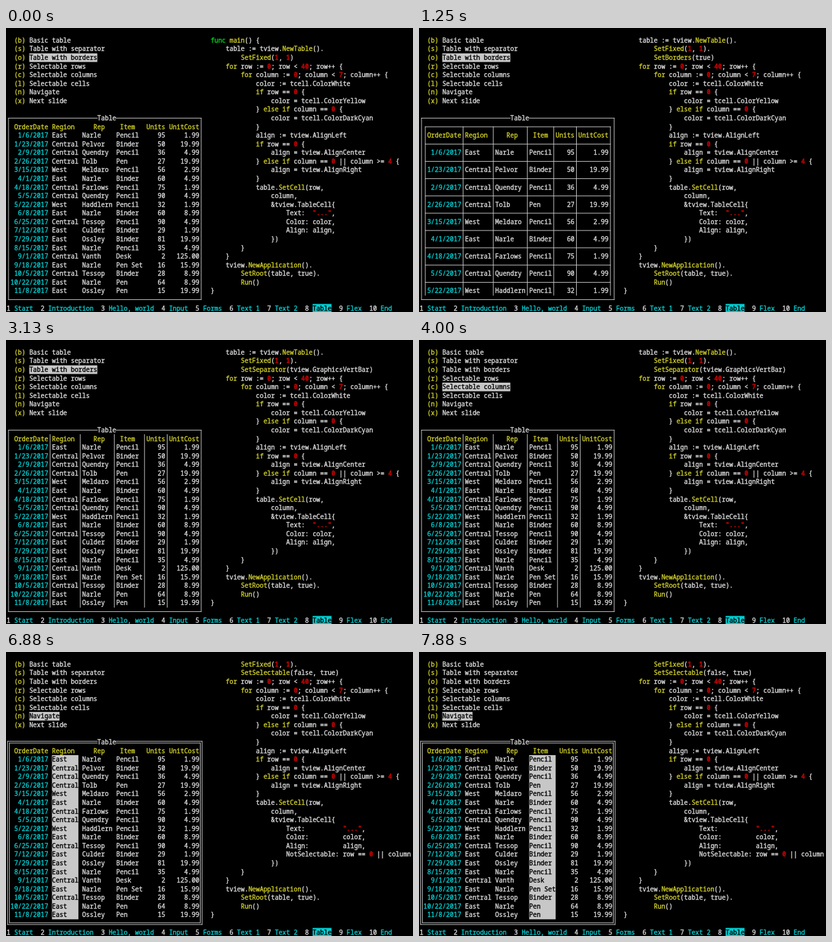
An HTML page with a canvas for the animation above (8000 ms loop, 640 px wide and 446 px high).

```html
<!DOCTYPE html>
<html lang="en">
<head>
<meta charset="utf-8">
<title>Terminal table</title>
<style>
  html, body { margin: 0; width: 100%; height: 100%; overflow: hidden; background: #000; }
  canvas { display: block; width: 640px; height: 446px; }
</style>
</head>
<body>
<canvas id="screen"></canvas>
<script>
const WIDTH = 640, HEIGHT = 446, LOOP = 8000;
const CELL_W = 5.94, CELL_H = 13.57, LEFT = 1, TOP = -0.9;
const WHITE = '#dadada', GRAY = '#c7c7c7', YELLOW = '#cfcd2a', CYAN = '#00cdd0',
      GREEN = '#00d420', RED = '#b80404', BLACK = '#000';

const canvas = document.getElementById('screen');
const ctx = canvas.getContext('2d');
const dpr = window.devicePixelRatio || 1;
canvas.width = WIDTH * dpr;
canvas.height = HEIGHT * dpr;
ctx.scale(dpr, dpr);
ctx.lineWidth = 0.4;
ctx.lineJoin = 'round';

const MENU = ['b Basic table', 's Table with separator', 'o Table with borders', 'r Selectable rows',
  'c Selectable columns', 'l Selectable cells', 'n Navigate', 'x Next slide'];

const TABS = ['Start', 'Introduction', 'Hello, world', 'Input', 'Forms', 'Text 1', 'Text 2',
  'Table', 'Flex', 'End'];

const HEADER = ['OrderDate', 'Region', 'Rep', 'Item', 'Units', 'UnitCost'];
const ORDERS = `1/6,East,Narle,Pencil,95,1.99
1/23,Central,Pelvor,Binder,50,19.99
2/9,Central,Quendry,Pencil,36,4.99
2/26,Central,Tolb,Pen,27,19.99
3/15,West,Meldaro,Pencil,56,2.99
4/1,East,Narle,Binder,60,4.99
4/18,Central,Farlows,Pencil,75,1.99
5/5,Central,Quendry,Pencil,90,4.99
5/22,West,Haddlern,Pencil,32,1.99
6/8,East,Narle,Binder,60,8.99
6/25,Central,Tessop,Pencil,90,4.99
7/12,East,Culder,Binder,29,1.99
7/29,East,Ossley,Binder,81,19.99
8/15,East,Narle,Pencil,35,4.99
9/1,Central,Vanth,Desk,2,125.00
9/18,East,Narle,Pen Set,16,15.99
10/5,Central,Tessop,Binder,28,8.99
10/22,East,Narle,Pen,64,8.99
11/8,East,Ossley,Pen,15,19.99`.split('\n').map(line => {
  const cells = line.split(',');
  cells[0] += '/2017';
  return cells;
});

// Extra call after SetFixed for each table mode
const CALLS = {
  basic: '',
  borders: 'SetBorders(true)',
  separator: 'SetSeparator(tview.GraphicsVertBar)',
  columns: 'SetSelectable(false, true)'
};

function codeFor(mode) {
  const call = CALLS[mode];
  const selectable = mode === 'columns';
  const field = (name, value) =>
    ' '.repeat(20) + (name + ':').padEnd(selectable ? 15 : 7) + value + ',\n';
  return `func main() {
    table := tview.NewTable().
        SetFixed(1, 1)${call && '.\n        ' + call}
    for row := 0; row < 40; row++ {
        for column := 0; column < 7; column++ {
            color := tcell.ColorWhite
            if row == 0 {
                color = tcell.ColorYellow
            } else if column == 0 {
                color = tcell.ColorDarkCyan
            }
            align := tview.AlignLeft
            if row == 0 {
                align = tview.AlignCenter
            } else if column == 0 || column >= 4 {
                align = tview.AlignRight
            }
            table.SetCell(row,
                column,
                &tview.TableCell{
${field('Text', '"..."')}${field('Color', 'color')}${field('Align', 'align')}${
  selectable ? field('NotSelectable', 'row == 0 || column == 0') : ''}                })
        }
    }
    tview.NewApplication().
        SetRoot(table, true).
        Run()
}`.split('\n').slice(-30);
}

// Each step changes part of the state at its time
const STEPS = [
  { at: 0, menu: 2, mode: 'basic', column: 0, focus: false },
  { at: 1250, mode: 'borders' },
  { at: 1880, menu: 1 },
  { at: 2500, mode: 'separator' },
  { at: 3000, menu: 2 },
  { at: 3380, menu: 3 },
  { at: 3750, menu: 4 },
  { at: 4380, mode: 'columns', column: 1 },
  { at: 5750, menu: 5 },
  { at: 6630, menu: 6 },
  { at: 6880, focus: true },
  { at: 7130, column: 2 },
  { at: 7630, column: 3 }
];

const colX = col => LEFT + col * CELL_W;
const rowY = row => TOP + row * CELL_H;
const midX = col => colX(col + 0.5);
const midY = row => rowY(row + 0.5);

function fill(col, row, cols, rows, color) {
  ctx.fillStyle = color;
  ctx.fillRect(colX(col), rowY(row), cols * CELL_W, rows * CELL_H);
}

// A thin outline gives the glyphs their slightly heavy weight
function text(col, row, str, color, bold) {
  ctx.font = `${bold ? 'bold ' : ''}9.9px "Noto Sans Mono", "DejaVu Sans Mono", monospace`;
  ctx.fillStyle = ctx.strokeStyle = color;
  [...str].forEach((ch, i) => {
    if (ch === ' ') return;
    const x = colX(col + i), y = rowY(row) + 10.2;
    ctx.fillText(ch, x, y);
    ctx.strokeText(ch, x, y);
  });
}

function hLine(x1, x2, y) {
  ctx.fillStyle = GRAY;
  ctx.fillRect(x1 - 0.5, y - 0.5, x2 - x1 + 1, 1);
}

function vLine(x, y1, y2) {
  ctx.fillStyle = GRAY;
  ctx.fillRect(x - 0.5, y1 - 0.5, 1, y2 - y1 + 1);
}

function drawMenu(selected) {
  MENU.forEach((item, i) => {
    const label = item.slice(2), on = i === selected;
    text(2, i + 1, `(${item[0]})`, YELLOW);
    if (on) fill(6, i + 1, label.length, 1, GRAY);
    text(6, i + 1, label, on ? BLACK : WHITE);
  });
}

function drawTabs() {
  let col = 0;
  TABS.forEach((name, i) => {
    const num = `${i + 1} `, on = name === 'Table';
    text(col, 32, num, WHITE);
    col += num.length;
    if (on) fill(col, 32, name.length, 1, CYAN);
    text(col, 32, name, on ? BLACK : CYAN);
    col += name.length + 2;
  });
}

function drawCode(mode) {
  const token = /(\bfunc\b)|(\b(?:main|for|if|else|New\w+|Set\w+|Run)\b)|(\b\d+\b|"[^"]*")|\w+|\s+|./g;
  codeFor(mode).forEach((line, i) => {
    for (const m of line.slice(0, 53).matchAll(token)) {
      const color = m[1] ? GREEN : m[2] ? YELLOW : m[3] ? RED : WHITE;
      text(54 + m.index, i + 1, m[0], color, Boolean(m[3]));
    }
  });
}

function drawFrame(focus) {
  for (const d of focus ? [-1.4, 1.4] : [0]) {
    const x1 = midX(0) + d, x2 = midX(51) - d, y1 = midY(10) + d, y2 = midY(31) - d;
    hLine(x1, colX(24), y1);
    hLine(colX(29), x2, y1);
    hLine(x1, x2, y2);
    vLine(x1, y1, y2);
    vLine(x2, y1, y2);
  }
  text(24, 10, 'Table', WHITE);
}

function drawTable({ mode, column }) {
  const bordered = mode === 'borders';
  const rows = bordered ? ORDERS.slice(0, 9) : ORDERS;
  const widths = HEADER.map((h, c) => Math.max(h.length, ...rows.map(r => r[c].length)));
  const first = bordered ? 2 : 1;
  const starts = widths.map((_, c) => first + c + widths.slice(0, c).reduce((a, b) => a + b, 0));
  const end = starts[5] + widths[5];
  const rowAt = i => bordered ? 12 + i * 2 : 11 + i;

  if (bordered) {
    for (const s of [...starts, end + 1]) vLine(midX(s - 1), midY(11), rowY(31));
    for (let r = 11; r < 31; r += 2) hLine(midX(1), midX(end), midY(r));
  } else if (mode === 'separator') {
    for (const s of starts.slice(1)) vLine(midX(s - 1), rowY(11), rowY(31));
  }
  if (column) fill(starts[column], 12, widths[column], 19, GRAY);

  HEADER.forEach((name, c) => {
    const pad = Math.floor(widths[c] / 2) - Math.floor(name.length / 2);
    text(starts[c] + pad, rowAt(0), name, YELLOW);
    rows.forEach((row, i) => {
      const right = c === 0 || c > 3;
      const str = right ? row[c].padStart(widths[c]) : row[c];
      const color = column && c === column ? BLACK : c ? WHITE : CYAN;
      text(starts[c], rowAt(i + 1), str, color);
    });
  });
}

function draw(state) {
  ctx.fillStyle = BLACK;
  ctx.fillRect(0, 0, WIDTH, HEIGHT);
  drawMenu(state.menu);
  drawCode(state.mode);
  drawFrame(state.focus);
  drawTable(state);
  drawTabs();
}

let shown = 0;
function tick() {
  const time = performance.now() % LOOP;
  const past = STEPS.filter(step => step.at <= time);
  if (past.length !== shown) {
    shown = past.length;
    draw(Object.assign({}, ...past));
  }
  requestAnimationFrame(tick);
}
tick();
</script>
</body>
</html>
```
